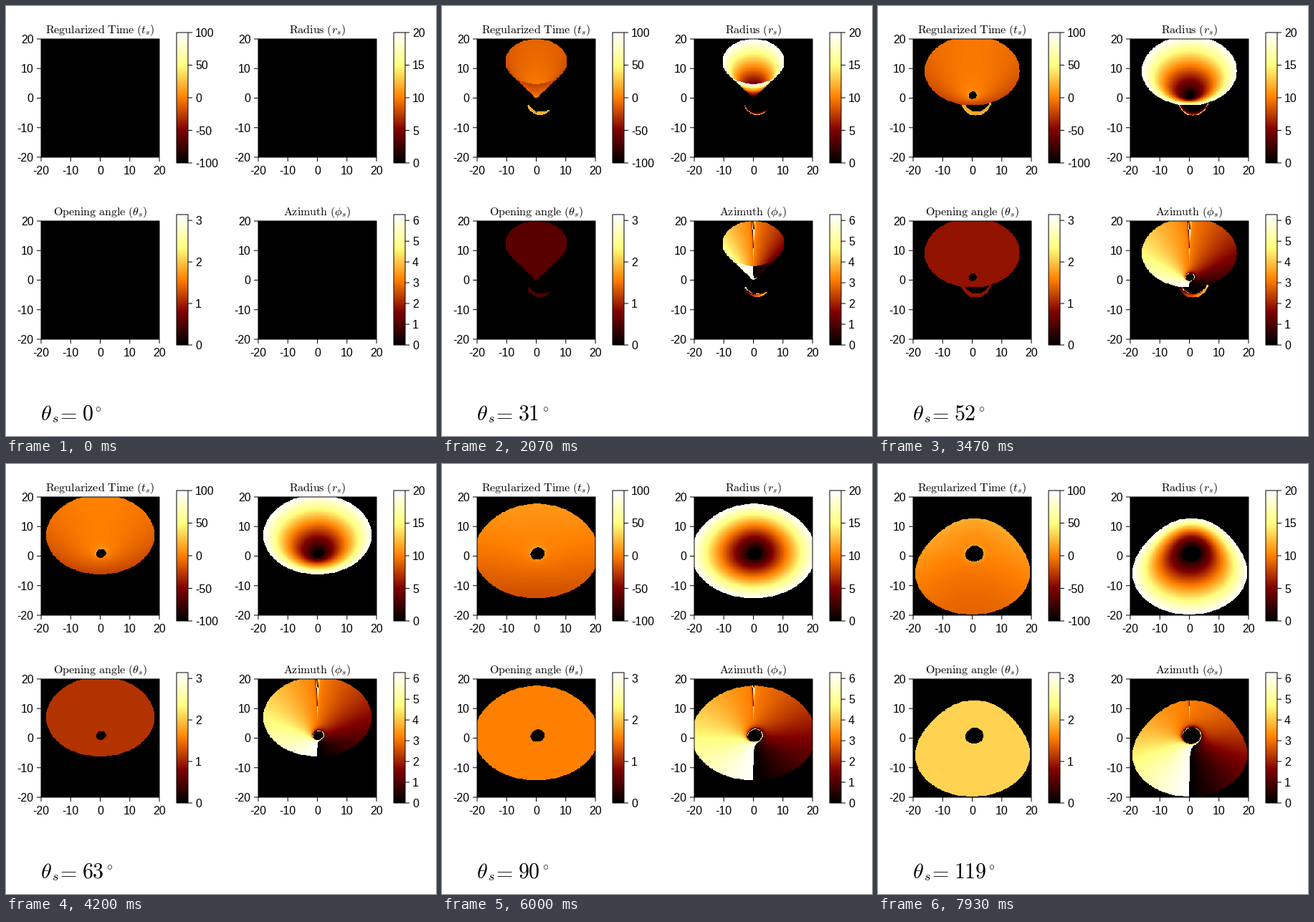
Animation of 600x600 px, one loop 8 s. Source, as a matplotlib script:

```python
import numpy as np
import matplotlib.pyplot as plt
from matplotlib.animation import FuncAnimation
from matplotlib.patches import Rectangle

plt.rcParams["mathtext.fontset"] = "cm"
plt.rcParams["font.family"] = "Liberation Sans"

PX = 0.72            # one pixel in points at 100 dpi
CONES = 120          # opening angles 0 .. 119 degrees, 15 per second
TICK = 40            # ms per drawn frame
FRAMES = 8000 // TICK
N = 200              # rays per side
SIDE = 165           # panel size in pixels
SPIN, INCL, FOV, RMAX = 0.99, np.pi / 4, 20.0, 20.0


def trace(steps=185, h=0.04):
    """Follow Kerr null geodesics back from the screen and record where
    each one first meets the cones of 0, 1, 2 ... degrees."""
    a = SPIN
    u_hor = 1 / (1 + np.sqrt(1 - a * a))
    axis = ((np.arange(N) + 0.5) / N * 2 - 1) * FOV
    al, be = (g.ravel() for g in np.meshgrid(axis, -axis))
    mu_o = np.cos(INCL)
    lam = -al * np.sin(INCL)
    eta = be**2 + (al**2 - a * a) * mu_o**2
    A = a * a - lam**2 - eta
    B = 2 * ((lam - a)**2 + eta)
    C = a * a * eta
    scale = np.sqrt(al**2 + be**2 + 4)

    # u = 1/r, w = u', m = cos(theta), v = m' in Mino time
    def rhs(s):
        u, w, m, v = s[:4]
        u2 = u * u
        D = np.maximum(1 - 2 * u + a * a * u2, 1e-3)
        P = 1 + (a * a - a * lam) * u2
        dphi = a - a * P / D
        dt = ((1 + a * a * u2) * P / D - w * (1 + 2 * u)) / u2
        dt += a * lam - a * a * (1 - m * m)
        return np.array([w, A * u + 1.5 * B * u2 - 2 * C * u2 * u,
                         v, A * m - 2 * a * a * m**3, dphi, dt])

    u0 = 1e-3
    v0 = be * np.sin(INCL)
    acc = A * mu_o - 2 * a * a * mu_o**3
    s = np.array([np.full_like(al, u0),
                  np.sqrt(1 + A * u0**2 + B * u0**3 - C * u0**4),
                  mu_o + v0 * u0 + acc * u0**2 / 2, v0 + acc * u0,
                  -lam * u0 / np.sin(INCL)**2, 0 * al])

    def view(s):
        u, m = s[0], np.clip(s[2], -1, 1)
        return np.degrees(np.arccos(m)), u, s[4], s[5] - 1 / u + 2 * np.log(u)

    time = np.full((CONES, N * N), -100, np.float32)
    rad = np.zeros((CONES, N * N), np.float32)
    phi = np.zeros((CONES, N * N), np.float32)
    old = view(s)
    for _ in range(steps):
        m0 = s[2].copy()
        d = h * np.clip(2 * np.sqrt(np.maximum(1 - m0**2, 0)), 0.15, 1) / scale
        d[(s[0] > u_hor) | ((s[0] < 0.045) & (s[1] < 0))] = 0
        k1 = rhs(s)
        k2 = rhs(s + d / 2 * k1)
        k3 = rhs(s + d / 2 * k2)
        k4 = rhs(s + d * k3)
        s = s + d / 6 * (k1 + 2 * k2 + 2 * k3 + k4)
        # azimuth swept on a great circle, safe across the pole
        K = np.sqrt(np.maximum(eta + lam**2 + a * a * m0 * s[2], 1e-9))
        turn = np.arctan2(lam * np.sin(K * d) / K, np.cos(K * d) - m0 * s[2])
        s[4] -= np.where(d > 0, turn, 0)

        new = view(s)
        lo, hi = np.minimum(old[0], new[0]), np.maximum(old[0], new[0])
        for j in (1, 2, 3):
            k = np.floor(lo).astype(int) + j
            i = np.flatnonzero((k <= hi) & (k < CONES))
            k = k[i]
            f = (k - old[0][i]) / (new[0][i] - old[0][i])
            u, p, t = (o[i] + f * (n[i] - o[i])
                       for o, n in zip(old[1:], new[1:]))
            ok = (u > 1 / RMAX) & (u < u_hor) & (rad[k, i] == 0)
            k, i = k[ok], i[ok]
            time[k, i] = t[ok]
            rad[k, i] = 1 / u[ok]
            phi[k, i] = p[ok] % (2 * np.pi)
        old = new
    angle = np.radians(np.arange(CONES, dtype=np.float32))
    cone = angle[:, None] * (rad > 0)
    return [g.reshape(CONES, N, N) for g in (time, rad, cone, phi)]


with np.errstate(all="ignore"):
    maps = trace()

fig = plt.figure(figsize=(6, 6), dpi=100, facecolor="white")
ax = fig.add_axes([0, 0, 1, 1])
ax.axis("off")


def line(x0, y0, x1, y1):
    ax.plot([x0, x1], [y0, y1], color="black", lw=PX, snap=False,
            solid_capstyle="butt")


def label(x, y, s, size=16, ha="left"):
    return ax.text(x, y, s, fontsize=size * PX, ha=ha, va="baseline")


def box(x, y, w, h):
    ax.add_patch(Rectangle((x, y), w, h, fill=False, ec="black", lw=PX,
                           snap=False, zorder=3))


def picture(data, x, y, w, h, lo, hi):
    return ax.imshow(data, cmap="afmhot", vmin=lo, vmax=hi, aspect="auto",
                     interpolation="nearest", extent=(x, x + w, y + h, y))


def panel(x, y, title, data, lo, hi, ticks):
    img = picture(data, x, y, SIDE, SIDE, lo, hi)
    box(x, y, SIDE, SIDE)
    right, bottom = x + SIDE, y + SIDE
    label(x + SIDE / 2, y - 8, title, ha="center")
    for i, v in enumerate(range(-20, 21, 10)):
        p = i * SIDE / 4
        line(x + p, bottom, x + p, bottom + 6)
        label(x + p, bottom + 24, str(v), ha="center")
        line(x - 6, bottom - p, x, bottom - p)
        label(x - 10.5, bottom - p + 6, str(v), ha="right")
    cx, cy, cw, ch = right + 24, y - 9, 16, 182
    picture(np.linspace(hi, lo, ch)[:, None], cx, cy, cw, ch, lo, hi)
    box(cx, cy, cw, ch)
    for v in ticks:
        p = cy + ch * (hi - v) / (hi - lo)
        line(cx + cw, p, cx + cw + 6, p)
        label(cx + 26, p + 6, str(v))
    return img


def name(words, sym):
    return r"$\mathrm{%s}\ (%s_s)$" % (words.replace(" ", r"\ "), sym)


specs = [(49, 46, name("Regularized Time", "t"), -100, 100, range(-100, 101, 50)),
         (352, 46, name("Radius", "r"), 0, 20, range(0, 21, 5)),
         (49, 300, name("Opening angle", r"\theta"), 0, np.pi, range(4)),
         (352, 300, name("Azimuth", r"\phi"), 0, 2 * np.pi, range(7))]
images = [panel(x, y, title, m[0], lo, hi, ticks)
          for (x, y, title, lo, hi, ticks), m in zip(specs, maps)]

label(48.5, 578, r"$\theta$", 30)
label(64, 581, "$s$", 18)
label(70, 578, "$=$", 30)
number = label(106.5, 578, "$0$", 30)
degree = ax.text(129, 561.5, r"$\circ$", fontsize=16 * PX,
                 ha="center", va="center")
ax.set(xlim=(0, 600), ylim=(600, 0))


def update(frame):
    i = (3 * frame + 2) // 5     # 15 cones a second at 25 frames a second
    for img, m in zip(images, maps):
        img.set_data(m[i])
    number.set_text(f"${i}$")
    degree.set_x(114 + 15 * len(str(i)))
    return images + [number, degree]


anim = FuncAnimation(fig, update, frames=FRAMES, interval=TICK,
                     repeat=True, repeat_delay=0, blit=False)
plt.show()
```
